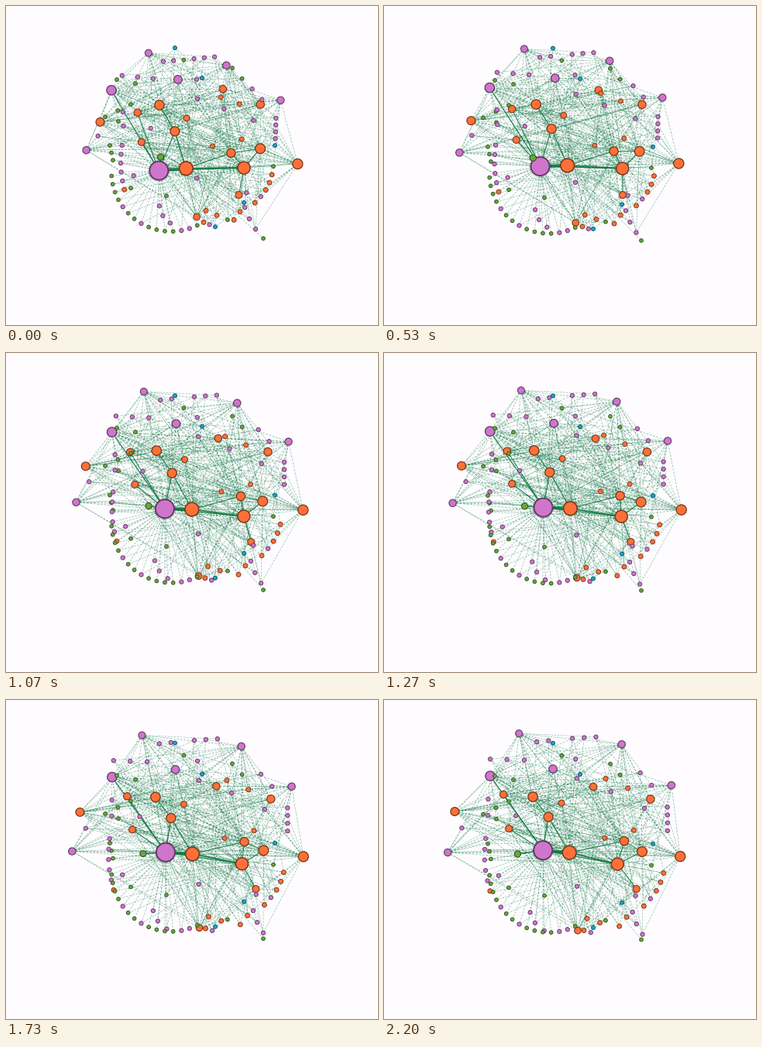
A matplotlib script that plays this animation: 480 by 412 pixels, repeating every 2.27 s.

```python
from itertools import combinations

import matplotlib.pyplot as plt
import numpy as np
from matplotlib.animation import FuncAnimation
from matplotlib.collections import LineCollection

WIDTH, HEIGHT, DPI = 480, 412, 64
PX = 72 / DPI
FRAMES, LOOP_MS = 34, 2270
CENTRE = np.array([240, 185])

FILL = {"P": (0.81, 0.46, 0.80), "O": (1.0, 0.44, 0.22),
        "G": (0.40, 0.66, 0.23), "B": (0.07, 0.66, 0.82)}
SMALL_RADIUS = {"P": 3.1, "O": 3.4, "G": 2.8, "B": 2.9}
LINE = (0.02, 0.45, 0.23)

# Major nodes: radius, x, y and the way travelled over one loop.
HUBS = {
    "P": [(13, 197, 213, 8, -19), (5, 184, 61, -10, -18), (5.2, 284, 77, 23, -20),
          (5.8, 222, 95, -4, -6), (6.8, 136, 109, 1, -11), (5.2, 354, 122, 17, -12),
          (5.2, 104, 186, -22, 11)],
    "O": [(6.8, 198, 128, -6, -3), (5.2, 170, 138, -16, -16), (6, 122, 150, -31, -6),
          (6.6, 218, 162, -6, -11), (4.4, 233, 145, -4, -12), (5, 175, 176, -14, -10),
          (5.2, 280, 107, -10, 5), (5.7, 328, 127, 16, 1), (6.2, 290, 190, 20, -8),
          (7, 328, 184, 5, 12), (8.7, 307, 209, -6, 3), (9.6, 232, 210, 7, -13),
          (7.2, 376, 204, 6, -2), (5, 300, 244, 26, 0), (4.8, 246, 272, 4, 26)],
    "G": [(4.6, 200, 195, -28, 4)],
}

# Strings of small nodes: colours, first point, last point, sideways bend.
CHAINS = [
    ("PPP", (150, 90), (190, 94), 0),
    ("GG", (143, 95), (167, 100), 0),
    ("PPGPPP", (203, 72), (269, 66), 0),
    ("BB", (218, 54), (253, 93), 0),
    ("PP", (246, 95), (247, 120), 0),
    ("GGPP", (292, 80), (330, 121), 0),
    ("OO", (277, 118), (301, 127), 0),
    ("PP", (281, 133), (319, 148), 0),
    ("PPPPB", (348, 145), (347, 180), 0),
    ("OO", (266, 181), (304, 172), 0),
    ("GGG", (161, 127), (128, 143), 0),
    ("PG", (151, 137), (145, 149), 0),
    ("PPP", (187, 158), (119, 168), -8),
    ("GGG", (134, 180), (138, 199), 0),
    ("PPPPPO", (150, 180), (153, 237), -3),
    ("PG", (165, 219), (161, 235), 0),
    ("PG", (246, 222), (207, 245), 0),
    ("PPP", (198, 258), (212, 280), -3),
    ("GOOOPO", (345, 207), (321, 254), 5),
    ("PBOO", (310, 241), (294, 276), 3),
    ("PPPG", (308, 260), (332, 300), -3),
    ("OOG", (258, 264), (286, 276), 0),
    ("OPB", (255, 279), (270, 285), 0),
]
FAN = "GGGGPGGPGGGGPPG"

HUB, PARTNER, EAST, CORE = 0, 18, 17, 22
STRONG = {
    (0, 18): 4, (17, 18): 1.8, (0, 17): 1.3, (0, 22): 1.5, (0, 10): 1.3,
    (10, 18): 1.3, (0, 4): 1.2, (0, 8): 1.1, (0, 12): 1.2, (7, 10): 1.2,
    (15, 18): 1.2, (15, 17): 1.1, (16, 17): 1.2, (17, 20): 1.1, (15, 16): 1,
}


def chain(count, first, last, bend):
    u = np.linspace(0, 1, count)[:, None]
    step = np.subtract(last, first)
    normal = np.array([step[1], -step[0]]) / np.hypot(*step)
    return first + u * step + bend * np.sin(np.pi * u) * normal


def fan(count):
    angle = np.radians(176 - 8 * np.arange(count))
    return np.column_stack([213 + 77 * np.cos(angle), 214 + 77 * np.sin(angle)])


def small_drift(points, kinds):
    """Purple and orange move outwards, green and blue sag a little."""
    out = points - CENTRE
    out = 19 * out / np.linalg.norm(out, axis=1, keepdims=True)
    sag = points * [0, 0.032]
    mobile = np.isin(kinds, ["P", "O"])[:, None]
    return np.where(mobile, out, sag)


def build_nodes():
    majors = np.array([row for rows in HUBS.values() for row in rows], float)
    kinds = [kind for kind, rows in HUBS.items() for _ in rows]
    points = np.vstack([chain(len(c), *ends) for c, *ends in CHAINS])
    small_kinds = list("".join(c for c, *_ in CHAINS))
    arc = fan(len(FAN))
    start = np.vstack([majors[:, 1:3], points, arc])
    drift = np.vstack([majors[:, 3:5], small_drift(points, small_kinds),
                       arc * [0, 0.032]])
    small_kinds += FAN
    radius = np.append(majors[:, 0], [SMALL_RADIUS[k] for k in small_kinds])
    return start, drift, radius, np.array([FILL[k] for k in kinds + small_kinds])


def build_links():
    rng = np.random.default_rng(7)
    links = {(a, b): 0.6 for a, b in combinations(range(CORE), 2)
             if rng.random() < (radius[a] + radius[b]) / 21}
    for i in range(CORE, len(start)):
        x, y = start[i]
        if x < 250 and y > 188:
            targets = [HUB]
            if rng.random() < 0.6:
                targets.append(rng.choice([PARTNER, EAST]))
        elif y > 295:
            targets = [PARTNER]
        else:
            reach = np.hypot(*(start[:CORE] - start[i]).T)
            pull = radius[:CORE] / (60 + reach)
            targets = rng.choice(CORE, 4, replace=False, p=pull / pull.sum())
        for target in targets:
            links[int(target), i] = 0.55
    links.update(STRONG)
    return np.array(list(links)), np.array(list(links.values()))


def positions(frame):
    u = min((frame + 0.4) / (FRAMES - 1), 1)
    bulge = u * (1 - u)
    # Nodes in the central band also swing to the right and back.
    swing = np.exp(-((start[:, 1] - 207) / 12) ** 2) * (radius > 4)
    pos = start + drift * (u + 0.5 * bulge)
    pos[:, 0] += 15 * bulge * swing
    return pos


start, drift, radius, fills = build_nodes()
pairs, weights = build_links()

fig = plt.figure(figsize=(WIDTH / DPI, HEIGHT / DPI), dpi=DPI, facecolor="#fefcff")
ax = fig.add_axes([0, 0, 1, 1])
ax.set_xlim(0, WIDTH)
ax.set_ylim(HEIGHT, 0)
ax.axis("off")

strong = weights > 0.7
lines = LineCollection(
    start[pairs], linewidths=weights * PX, zorder=1,
    colors=[(*LINE, 0.85 if s else 0.55) for s in strong],
    linestyles=["solid" if s else (0, (5, 2.5)) for s in strong])
ax.add_collection(lines)

border = 0.6 + 0.1 * radius
dots = ax.scatter(*start.T, s=((2 * radius - border) * PX) ** 2, c=fills,
                  edgecolors=fills * 0.48, linewidths=border * PX, zorder=2)


def update(frame):
    pos = positions(frame)
    lines.set_segments(pos[pairs])
    dots.set_offsets(pos)
    return lines, dots


anim = FuncAnimation(fig, update, frames=FRAMES, interval=LOOP_MS / FRAMES,
                     repeat=True, repeat_delay=0, blit=False)
plt.show()
```
